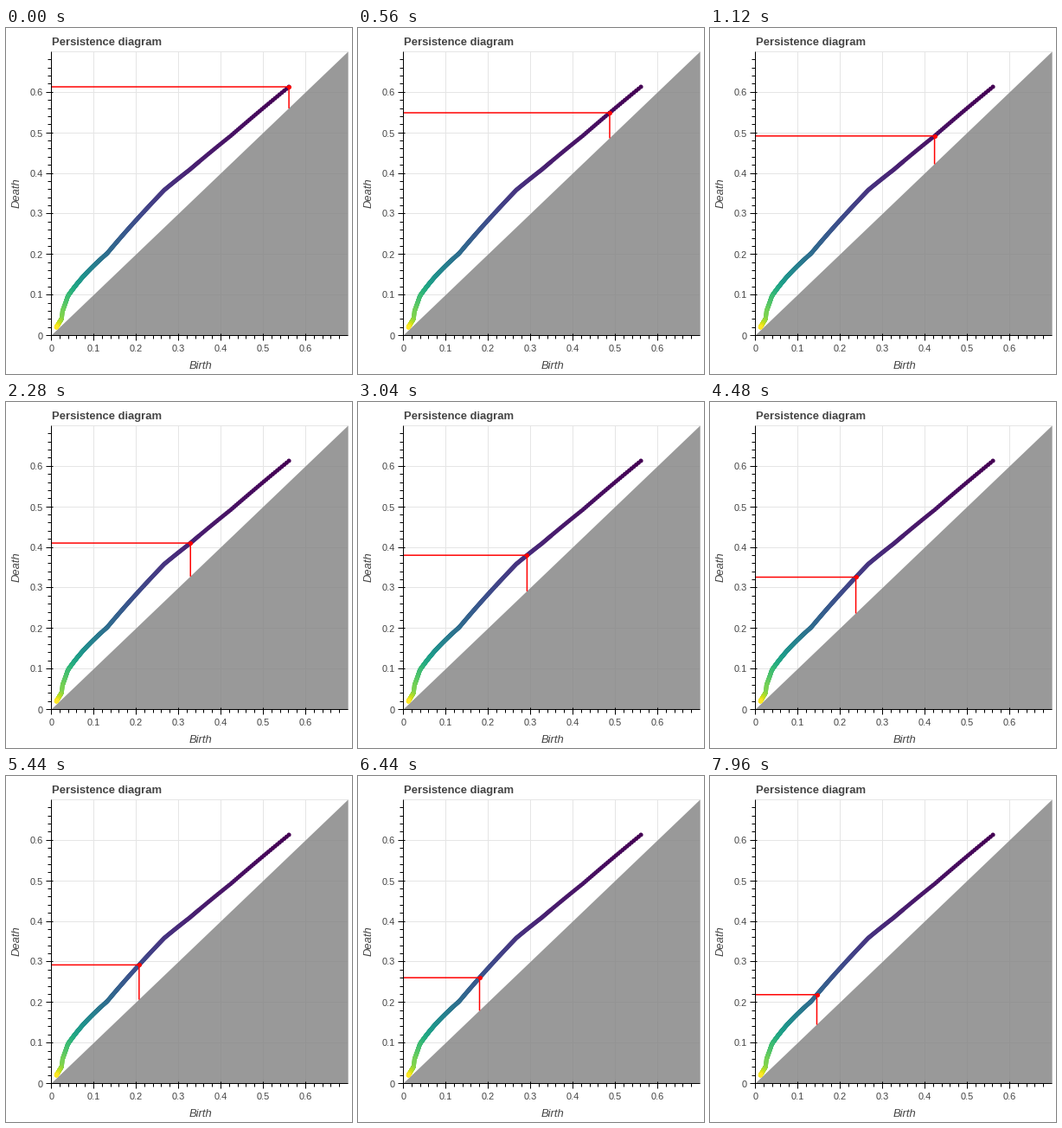
Animation, 400 px wide and 400 px high, one loop 8000 ms. Source, as a matplotlib script:

```python
import numpy as np
import matplotlib.pyplot as plt
from matplotlib.animation import FuncAnimation
from matplotlib.patches import Polygon, Rectangle

SIZE, DPI = 400, 100
FRAMES, STEP = 200, 40
X0, Y0 = 52.5, 355.5          # plot corner at the data origin
W, H = 343, 328               # plot size, spans 0 to 0.7
COUNT = 620
INK, GRID = "#444444", "#e5e5e5"
PT = 72 / DPI

plt.rcParams["font.family"] = "Liberation Sans"

# Birth decays exponentially between (point index, px right of origin).
DECAY = [(0, 274.6), (47, 171), (84, 136), (199, 71), (COUNT - 1, 5.8)]
# Death follows power laws between (px right, px up).
CURVE = [(5.8, 9.5), (11.8, 19.5), (12.8, 28), (19, 45.5), (37.5, 69),
         (64.5, 95), (88, 122.3), (130.5, 168.2), (160, 191.8),
         (207.5, 231), (274.6, 287.5)]


def decay(n, keys):
    xs, ys = np.array(keys).T
    return np.exp(np.interp(n, xs, np.log(ys)))


def power(x, keys):
    xs, ys = np.log(np.array(keys)).T
    return np.exp(np.interp(np.log(x), xs, ys))


births = decay(np.arange(COUNT), DECAY)
px, py = X0 + births, Y0 - power(births, CURVE)
diag = Y0 - births * H / W

fig = plt.figure(figsize=(SIZE / DPI, SIZE / DPI), dpi=DPI, facecolor="white")
ax = fig.add_axes([0, 0, 1, 1])
ax.set(xlim=(0, SIZE), ylim=(SIZE, 0))
ax.axis("off")


def line(xs, ys, color, z, width=1):
    return ax.plot(xs, ys, color=color, lw=width * PT, zorder=z, snap=False,
                   solid_capstyle="butt")[0]


def label(x, y, text, size, **kw):
    ax.text(x, y, text, fontsize=size * PT, color=INK, zorder=8,
            va="baseline", **kw)


def tick_x(v):
    return X0 + round(v / 0.7 * W)


def tick_y(v):
    return Y0 - round(v / 0.7 * H)


# grid, shaded half and frame
for i in range(7):
    gx, gy = tick_x(i / 10), tick_y(i / 10)
    line([gx, gx], [Y0 - H, Y0], GRID, 1)
    line([X0, X0 + W], [gy, gy], GRID, 1)
ax.add_patch(Rectangle((X0, Y0 - H), W, H, fill=False, ec=GRID,
                       lw=PT, zorder=1.5, snap=False))
ax.add_patch(Polygon([(X0, Y0), (X0 + W, Y0 - H), (X0 + W, Y0)],
                     fc="#808080", alpha=0.8, lw=0, zorder=2))

# axes with ticks
line([X0, X0 + W], [Y0, Y0], "black", 7)
line([X0, X0], [Y0 - H, Y0], "black", 7)
for i in range(35):
    tx, ty = tick_x(i / 50), tick_y(i / 50)
    major = i % 5 == 0
    out, inner = (6, 2) if major else (4, 0)
    line([tx, tx], [Y0 - inner, Y0 + out], "black", 7)
    line([X0 - out, X0 + inner], [ty, ty], "black", 7)
    if major:
        text = f"{i / 50:.1f}" if i else "0"
        label(tx, 374, text, 11, ha="center")
        label(42.5, ty + 4, text, 11, ha="right")

label(53, 20, "Persistence diagram", 13, weight="bold")
label(224.5, 394, "Birth", 13, style="italic", ha="center")
label(15.5, 191, "Death", 13, style="italic", ha="center",
      rotation=90, rotation_mode="anchor")

ax.scatter(px, py, s=(5 * PT) ** 2, c=np.linspace(0, 1, COUNT),
           cmap="viridis", linewidths=0, zorder=4, snap=False)

across = line([], [], "red", 5, 1.5)
down = line([], [], "red", 5, 1.5)
dot, = ax.plot([], [], "o", color="red", ms=5 * PT, mew=0, zorder=6,
               snap=False)


def draw(n):
    x, y = px[n], py[n]
    across.set_data([X0 + 0.5, x], [y, y])
    down.set_data([x, x], [y, diag[n]])
    dot.set_data([x], [y])
    return across, down, dot


anim = FuncAnimation(fig, draw, frames=FRAMES, interval=STEP,
                     repeat=True, repeat_delay=0)
plt.show()
```
